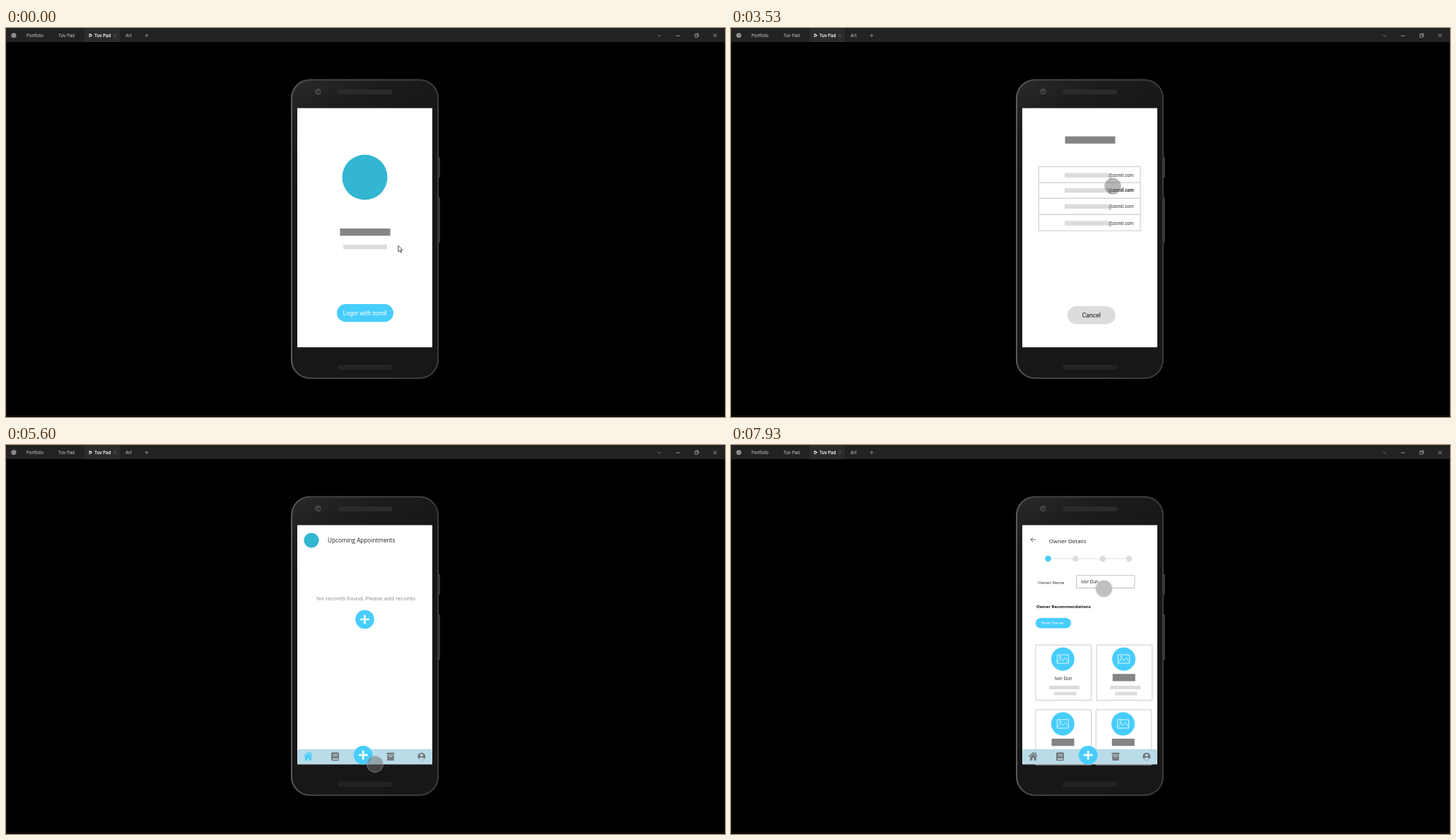
Animation, 1017 px wide and 551 px high, one loop 8 s. Source, as an HTML page with a canvas:

```html
<!DOCTYPE html>
<html lang="en">
<head>
<meta charset="utf-8">
<title>Prototype walkthrough</title>
<style>
html, body { margin: 0; width: 100%; height: 100%; overflow: hidden; background: #000; }
canvas { display: block; width: 1017px; height: 551px; }
</style>
</head>
<body>
<canvas id="stage"></canvas>
<script>
const W = 1017, H = 551, LOOP = 8000, STEP = 1000 / 15;
const BLUE = '#47cdfc', DARK = '#858585', LIGHT = '#dcdcdc', ICON = '#767b7e', NAV = '#b9dce8', LOGO = '#32b6d2';
const SANS = '"Open Sans", "Noto Sans", sans-serif';
const ROBOTO = 'Roboto, sans-serif';
const INTER = 'Inter, sans-serif';
const OWNER = 'Ivor Dun', MAIL = 'zomil', PROJECT = 'Tuv Pad';

const canvas = document.getElementById('stage');
const ratio = window.devicePixelRatio || 1;
canvas.width = W * ratio;
canvas.height = H * ratio;
const c = canvas.getContext('2d');

// Pointer path: time, x, y. Equal neighbours are rests.
const PATH = [
  [0, 560, 312], [67, 560, 312], [467, 775, 360], [933, 512, 429], [1333, 508, 416],
  [1800, 517, 424], [2333, 517, 424], [3200, 539, 235], [3333, 540, 224], [3733, 540, 224],
  [4267, 529, 265], [4467, 511, 345], [4600, 518, 374], [5133, 522, 452], [6267, 522, 452],
  [6800, 459, 335], [7133, 465, 270], [7333, 517, 203], [7467, 549, 167], [7667, 527.5, 203],
  [8000, 527.5, 203]
];

function slope(i, axis) {
  const a = PATH[i - 1], p = PATH[i], b = PATH[i + 1];
  const rests = (u, v) => u[1] === v[1] && u[2] === v[2];
  if (!a || !b || rests(a, p) || rests(p, b)) return 0;
  return (b[axis] - a[axis]) / (b[0] - a[0]);
}

function pointer(t) {
  let i = 0;
  while (i < PATH.length - 2 && t >= PATH[i + 1][0]) i++;
  const a = PATH[i], b = PATH[i + 1], d = b[0] - a[0], u = (t - a[0]) / d;
  const k = u * u * (3 - 2 * u);
  return [1, 2].map(n => a[n] + (b[n] - a[n]) * k
    + d * (slope(i, n) * u * (1 - u) * (1 - u) - slope(i + 1, n) * u * u * (1 - u)));
}

function rect(x1, y1, x2, y2, fill, r = 0) {
  c.fillStyle = fill;
  c.beginPath();
  c.roundRect(x1, y1, x2 - x1, y2 - y1, r);
  c.fill();
}

function frame(x1, y1, x2, y2, color, width = 1, r = 0) {
  c.strokeStyle = color;
  c.lineWidth = width;
  c.beginPath();
  c.roundRect(x1, y1, x2 - x1, y2 - y1, r);
  c.stroke();
}

function disc(x, y, r, fill) {
  c.fillStyle = fill;
  c.beginPath();
  c.arc(x, y, r, 0, Math.PI * 2);
  c.fill();
}

function line(points, color, width = 1) {
  c.strokeStyle = color;
  c.lineWidth = width;
  c.beginPath();
  points.forEach(([x, y]) => c.lineTo(x, y));
  c.stroke();
}

function poly(points, fill) {
  c.fillStyle = fill;
  c.beginPath();
  points.forEach(([x, y]) => c.lineTo(x, y));
  c.closePath();
  c.fill();
}

function text(str, x, y, size, color, family = SANS, weight = 400, align = 'left') {
  c.font = `${weight} ${size}px ${family}`;
  c.fillStyle = color;
  c.textAlign = align;
  c.fillText(str, x, y);
}

function cross(x, y, r, color, width) {
  line([[x - r, y - r], [x + r, y + r]], color, width);
  line([[x - r, y + r], [x + r, y - r]], color, width);
}

function plus(x, y, r, color, width) {
  line([[x - r, y], [x + r, y]], color, width);
  line([[x, y - r], [x, y + r]], color, width);
}

function addButton(x, y) {
  disc(x, y, 13.3, BLUE);
  c.lineCap = 'round';
  plus(x, y, 5.2, '#fff', 2.7);
  c.lineCap = 'butt';
}

function topBar() {
  rect(0, 0, W, 20, '#222');
  rect(111, 0, 161, 20, '#2c2c2c');
  disc(11, 10.5, 3.6, '#8a8a8a');
  text('Portfolio', 29, 12.8, 6, '#b8b8b8', INTER, 500);
  text(PROJECT, 74, 12.8, 6, '#b8b8b8', INTER, 500);
  text(PROJECT, 125, 12.8, 6, '#fff', INTER, 600);
  text('Art', 169, 12.8, 6, '#b8b8b8', INTER, 500);
  c.lineJoin = 'round';
  line([[118, 8.3], [121.8, 10.6], [118, 12.9], [118, 8.3], [121.8, 10.6]], '#fff', 0.9);
  c.lineJoin = 'miter';
  cross(154, 10.6, 1.8, '#777', 0.6);
  plus(199, 10.6, 2.5, '#999', 0.8);
  line([[921.5, 9.5], [924, 12], [926.5, 9.5]], '#888', 0.8);
  line([[947.5, 11], [953, 11]], '#aaa', 0.9);
  frame(974.3, 9.2, 978.2, 13.1, '#aaa', 0.8);
  line([[975.5, 9], [975.5, 8], [979.4, 8], [979.4, 12], [978.4, 12]], '#aaa', 0.8);
  cross(1003, 10.6, 2.4, '#bbb', 0.8);
}

function phone() {
  rect(611, 183, 614, 212, '#363636', 1);
  rect(611, 240, 614, 304, '#363636', 1);
  const body = c.createLinearGradient(403, 72, 470, 190);
  body.addColorStop(0, '#2a2a2a');
  body.addColorStop(0.5, '#1c1c1c');
  body.addColorStop(1, '#171717');
  const edge = c.createLinearGradient(403, 0, 612, 0);
  edge.addColorStop(0, '#5c5c5c');
  edge.addColorStop(0.15, '#424242');
  edge.addColorStop(1, '#3c3c3c');
  rect(403, 72.5, 612, 497, body, 27);
  frame(404, 73.5, 611, 496, edge, 2, 26);
  rect(469, 87, 546.5, 94, '#2b2b2b', 3.5);
  rect(469, 477, 546.5, 484, '#232323', 3.5);
  disc(441.5, 90, 4.2, '#4b4b4b');
  disc(441.7, 90.2, 2.3, '#262626');
  disc(441.2, 89.6, 0.9, '#5b5b5b');
}

function blank() {
  rect(412, 113.5, 603, 452.3, '#fff');
}

function login() {
  blank();
  disc(507.5, 211.5, 32, LOGO);
  rect(472.5, 284, 543.5, 294.3, DARK);
  rect(477, 306.8, 539, 313.2, LIGHT);
  rect(468, 391, 548, 416.3, BLUE, 12.6);
  text('Login with ' + MAIL, 507.7, 406.8, 8.5, '#fff', ROBOTO, 400, 'center');
}

function accounts() {
  blank();
  rect(472.5, 153.5, 543.5, 163.8, DARK);
  frame(435.3, 196.3, 579, 287.2, '#d4d4d4', 1.3);
  [219, 241.3, 264.2].forEach(y => line([[435, y], [579, y]], '#d4d4d4', 1.4));
  [208.6, 230.1, 252.8, 276.5].forEach((y, i) => {
    rect(472, y - 3.2, 534.3, y + 3.2, LIGHT);
    text(`@${MAIL}.com`, 534, y + 2, 6.4, i === 1 ? '#000' : '#2e2e2e', ROBOTO, i === 1 ? 500 : 400);
  });
  rect(476, 394, 543.7, 419.4, LIGHT, 12.7);
  text('Cancel', 509.8, 410, 8.6, '#151515', ROBOTO, 400, 'center');
}

function navBar(homeColor) {
  rect(412, 430.8, 603, 452.3, NAV, [3, 3, 0, 0]);

  const x = 427.4;
  line([[x - 6, 441.3], [x, 435.8], [x + 6, 441.3]], homeColor, 1.4);
  rect(x + 2.7, 435.5, x + 4.3, 439, homeColor);
  poly([[x, 437.6], [x + 4.4, 441.6], [x + 4.4, 447], [x + 1.3, 447], [x + 1.3, 443.4],
    [x - 1.3, 443.4], [x - 1.3, 447], [x - 4.4, 447], [x - 4.4, 441.6]], homeColor);

  rect(460, 435.3, 471, 447.3, ICON, 1.6);
  rect(463, 437.9, 469, 438.8, NAV);
  rect(463, 439.9, 469, 440.8, NAV);
  rect(462, 444, 470, 445.6, NAV);

  rect(538.5, 435.8, 549.5, 438.6, ICON, 0.6);
  rect(539.2, 439.4, 548.8, 447, ICON, 0.8);
  rect(542, 440.8, 546, 441.9, NAV, 0.4);

  disc(587.8, 441.2, 5.5, ICON);
  disc(587.8, 439.4, 1.9, NAV);
  c.fillStyle = NAV;
  c.beginPath();
  c.ellipse(587.8, 444.5, 3.4, 1.8, 0, 0, Math.PI * 2);
  c.fill();

  addButton(505.2, 439.2);
}

function home() {
  blank();
  disc(432, 135, 10.6, LOGO);
  text('Upcoming Appointments', 455, 137.8, 8.2, '#222');
  text('No records found. Please add records', 509, 219.8, 8, DARK, SANS, 400, 'center');
  addButton(507.5, 247);
  navBar(BLUE);
}

function card(x, y, bottom, name) {
  const mid = x + 38.4;
  frame(x, y, x + 78.6, bottom, '#cbcbcb');
  disc(mid, y + 20, 16.5, BLUE);
  frame(mid - 8, y + 14, mid + 8, y + 26, '#fff', 0.8);
  line([[mid - 7.6, y + 24], [mid - 3, y + 19.5], [mid, y + 22.5], [mid + 3.2, y + 18], [mid + 7.6, y + 23.6]], '#fff', 0.8);
  c.strokeStyle = '#fff';
  c.beginPath();
  c.arc(mid - 3.6, y + 17.2, 1.2, 0, Math.PI * 2);
  c.stroke();
  if (name) text(name, mid + 0.8, y + 49.7, 6.2, '#222', SANS, 400, 'center');
  else rect(mid - 15.8, y + 41, mid + 16.2, y + 51.3, DARK);
  rect(mid - 19.4, y + 57.8, mid + 23.6, y + 62.9, LIGHT);
  rect(mid - 12.4, y + 66.5, mid + 19, y + 71.4, LIGHT);
}

function owner(found) {
  blank();
  line([[430.8, 134], [423.8, 134]], '#555', 0.9);
  line([[427, 130.8], [423.8, 134], [427, 137.2]], '#555', 0.9);
  text('Owner Details', 449.8, 138.6, 8, '#222');
  line([[448.5, 161], [563, 161]], '#e0e0e0', 1);
  [448.5, 487.3, 525.8, 563].forEach((x, i) => disc(x, 161, 4.3, i ? LIGHT : BLUE));
  text('Owner Name', 434, 196.7, 6.05, '#222');
  frame(488.6, 184.8, 570.8, 202.6, '#c6c6c6', 1.1);
  text('Owner Recommendations', 432, 231.1, 5.95, '#111', SANS, 700);
  rect(430.8, 245, 481, 259.6, BLUE, 7.3);
  text('New Owner', 455.3, 254.4, 5.95, '#fff', SANS, 400, 'center');
  if (found) {
    text(OWNER, 495, 195.8, 6.2, '#222');
    card(430.9, 283.2, 361.5, OWNER);
    card(517.2, 283.2, 361.5);
    card(430.9, 375, 453);
    card(516.2, 375, 453);
  } else {
    text('Please start typing owner name to get', 514, 289, 8, DARK, SANS, 400, 'center');
    text('recommendations', 514, 299.8, 8, DARK, SANS, 400, 'center');
  }
  navBar(ICON);
}

function arrow() {
  const shape = [[554.8, 308.2], [554.8, 316.8], [556.8, 315.1], [558.2, 318.2],
    [559.6, 317.6], [558.2, 314.6], [560.8, 314.4]];
  poly(shape, '#fff');
  line([...shape, shape[0]], '#222', 0.8);
}

function touch(x, y, pressed) {
  if (pressed) {
    disc(x, y, 11.6, 'rgba(110,110,110,0.5)');
    c.strokeStyle = 'rgba(190,190,190,0.6)';
    c.lineWidth = 0.8;
    c.beginPath();
    c.arc(x, y, 11.5, 0, Math.PI * 2);
    c.stroke();
    return;
  }
  const halo = c.createRadialGradient(x, y + 0.6, 10.5, x, y + 0.6, 13);
  halo.addColorStop(0, 'rgba(120,120,120,0.4)');
  halo.addColorStop(1, 'rgba(120,120,120,0)');
  disc(x, y + 0.6, 13, halo);
  disc(x, y, 11.2, 'rgba(190,190,190,0.88)');
}

function screen(t) {
  if (t < 2200) login();
  if (t > 1810 && t < 3590) {
    const u = Math.min(1, (t - 1800) / 460);
    // The account list dissolves in over the login page.
    c.save();
    c.globalAlpha = 1 - (1 - u) * (1 - u);
    accounts();
    c.restore();
  } else if (t >= 3590 && t < 5790) home();
  else if (t >= 5790) owner(t >= 7920);
}

function draw(ms) {
  const t = Math.floor((ms + 7) / STEP) * STEP;
  c.setTransform(ratio, 0, 0, ratio, 0, 0);
  rect(0, 0, W, H, '#000');
  frame(0.5, 19.5, W - 0.5, H - 1.5, '#141414');
  topBar();
  phone();
  screen(t);
  if (t < 130) return arrow();
  const pressed = (t > 3525 && t < 3660) || (t > 5590 && t < 5860) || (t > 7790 && t < 7920);
  touch(...pointer(t), pressed);
}

function tick() {
  draw(performance.now() % LOOP);
  requestAnimationFrame(tick);
}
tick();
</script>
</body>
</html>
```
